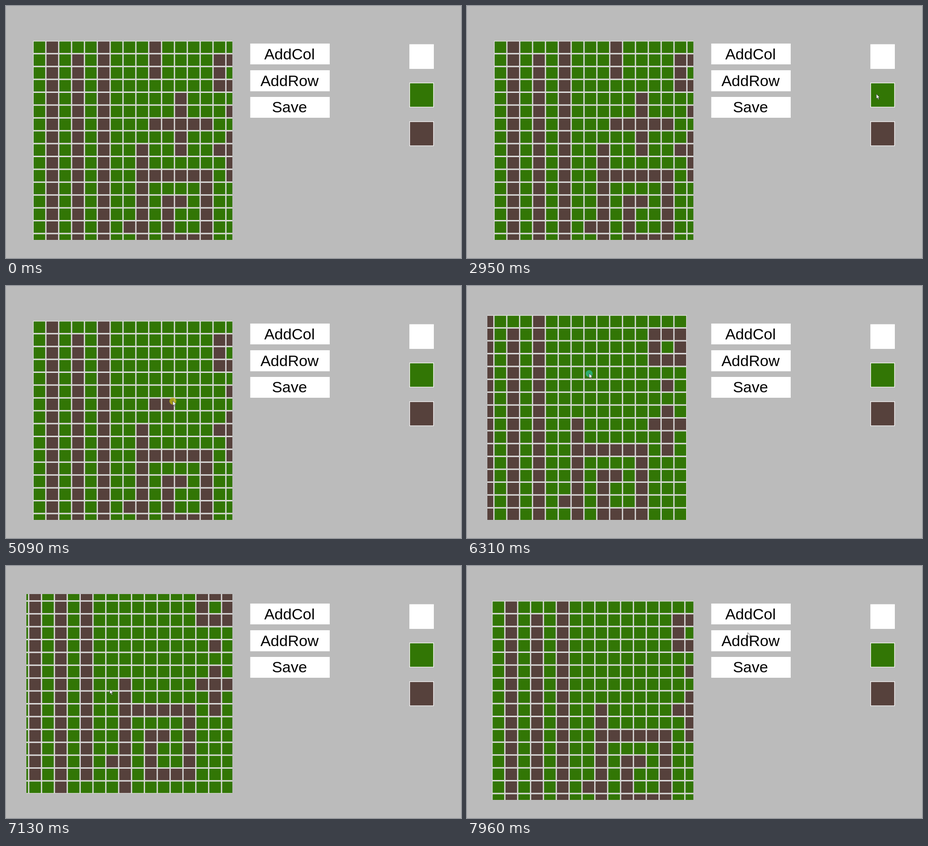
Recreate the animation shown at these times as an HTML page with a canvas. Size 1005 px wide and 557 px high, loop 8000 ms.

```html
<!DOCTYPE html>
<html>
<head>
<meta charset="utf-8">
<title>Tile editor</title>
<style>
  html, body { margin: 0; width: 100%; height: 100%; overflow: hidden; background: #bbb; }
  svg, canvas { position: absolute; left: 0; top: 0; }
  text { font: 34px "Liberation Sans", Arial, sans-serif; text-anchor: middle; fill: #000; }
</style>
</head>
<body>
<svg width="1005" height="557">
  <g fill="#fff">
    <rect x="539.5" y="83" width="175.5" height="46"/>
    <rect x="539.5" y="142" width="175.5" height="46.5"/>
    <rect x="539.5" y="201" width="175.5" height="46"/>
    <rect x="891" y="84.5" width="54" height="54.5"/>
    <rect x="891" y="169.5" width="54" height="54.5"/>
    <rect x="891" y="255" width="54" height="54.5"/>
  </g>
  <rect x="892.3" y="170.8" width="51.4" height="52" fill="#327605"/>
  <rect x="892.3" y="256.3" width="51.4" height="52" fill="#56413c"/>
  <text x="626.2" y="117.6">AddCol</text>
  <text x="626.2" y="176.5">AddRow</text>
  <text x="626.2" y="235.4">Save</text>
</svg>
<canvas id="stage" width="1005" height="557"></canvas>
<script>
const ctx = document.getElementById('stage').getContext('2d');
const LOOP = 8000, STEP = 10, LAG = 40, PITCH = 28.4, SIZE = 17;
const GREEN = '#327605', BROWN = '#56413c';
const arrow = new Path2D('M0 0V10.5L2.4 8.3 4.2 12.3 5.8 11.5 4.1 7.7 7.2 7.5Z');
const clamp = (v, lo, hi) => Math.max(lo, Math.min(hi, v));

// Time at which each tile turns green; 0 means always green
const greenFrom = new Array(SIZE * SIZE).fill(0);

function path(...points) {
  points.forEach(([c, r], i) => {
    const [pc, pr] = points[i - 1] || [c, r];
    const n = Math.max(Math.abs(c - pc), Math.abs(r - pr)) || 1;
    for (let k = 0; k <= n; k++)
      greenFrom[(pr + (r - pr) * k / n) * SIZE + pc + (c - pc) * k / n] = Infinity;
  });
}
function plus(c, r, arm) {
  path([c - arm, r], [c + arm, r]);
  path([c, r - arm], [c, r + arm]);
}

path([1, 0], [1, 15]);
path([3, 1], [3, 16]);
path([5, 0], [5, 15]);
path([8, 16], [8, 8]);
path([8, 10], [13, 10], [13, 15], [10, 15], [10, 12], [11, 12]);
path([7, 14]);
path([9, 0], [9, 2]);
path([14, 1], [16, 1], [16, 3], [14, 3], [14, 1]);
path([15, 5]);
path([15, 10]);
plus(11, 6, 2);
plus(15, 8, 1);

// Pointer stops: time, x, y
const stops = [
  [50, 946, 536], [270, 723, 263], [520, 723, 263], [1050, 919, 167],
  [1250, 914, 190], [1360, 914, 190], [1850, 915, 122], [1990, 913, 115],
  [2190, 913, 115], [2430, 920, 193], [2890, 920, 193], [3200, 690, 208],
  [3670, 323, 139], [3800, 322, 98], [3840, 322, 98], [4200, 386, 196],
  [4620, 386, 318], [4850, 442, 260], [5090, 369, 254], [5180, 320, 258],
  [5340, 320, 258], [6110, 345, 206], [6150, 345, 206], [6500, 134, 165],
  [6640, 128, 142], [6780, 142, 140], [7130, 229, 272], [7200, 255.5, 310],
  [7450, 289, 372], [7770, 503, 225], [7960, 620, 147]
];
const isPainting = t => t >= 3640 && t < 5240;
const isDragging = t => t >= 6150 && t < 6780 || t >= 7200 && t < 7450;

// Slope at a stop, flat at turns and rests
function slope(i, axis) {
  const a = stops[i - 1], b = stops[i], c = stops[i + 1];
  if (!a || !c || (b[axis] - a[axis]) * (c[axis] - b[axis]) <= 0) return 0;
  return (c[axis] - a[axis]) / (c[0] - a[0]);
}

function pointerAt(t) {
  const next = stops.findIndex(s => s[0] > t);
  if (next === 0) return stops[0].slice(1);
  if (next < 0) return stops[stops.length - 1].slice(1);
  const a = stops[next - 1], b = stops[next];
  const span = b[0] - a[0], p = (t - a[0]) / span, q = 1 - p;
  return [1, 2].map(k =>
    a[k] * q * q * (1 + 2 * p) + b[k] * p * p * (1 + 2 * q) +
    span * p * q * (slope(next - 1, k) * q - slope(next, k) * p));
}

// Play the session once: painting turns tiles green, dragging scrolls within limits
const scroll = [];
let ox = 60.5, oy = 77.5;
for (let t = 0; t <= LOOP; t += STEP) {
  const [x, y] = pointerAt(t);
  if (isPainting(t)) {
    const tile = Math.floor((y - oy) / PITCH) * SIZE + Math.floor((x - ox) / PITCH);
    greenFrom[tile] = Math.min(greenFrom[tile], t + LAG);
  }
  scroll.push([ox, oy]);
  if (isDragging(t)) {
    const [nx, ny] = pointerAt(t + STEP);
    ox = clamp(ox + nx - x, 3.5, 60.5);
    oy = clamp(oy + ny - y, 20.5, 77.5);
  }
}

function drawGrid(t) {
  const [left, top] = scroll[Math.floor(t / STEP)];
  ctx.save();
  ctx.beginPath();
  ctx.rect(45, 62, 455, 455);
  ctx.clip();
  greenFrom.forEach((time, i) => {
    const x = left + i % SIZE * PITCH, y = top + Math.floor(i / SIZE) * PITCH;
    ctx.fillStyle = '#eee';
    ctx.fillRect(x - 0.5, y - 0.4, 27.6, 27.6);
    ctx.fillStyle = t < time ? BROWN : GREEN;
    ctx.fillRect(x + 0.5, y + 0.9, 25.7, 25.4);
  });
  ctx.restore();
}

function drawPointer(t) {
  if (t < stops[0][0]) return;
  const painting = isPainting(t);
  ctx.save();
  ctx.translate(...pointerAt(t));
  if (painting || isDragging(t)) {
    ctx.fillStyle = painting ? 'rgba(190,180,20,.78)' : 'rgba(45,180,130,.88)';
    ctx.beginPath();
    ctx.arc(0, 0.5, 7.7, 0, Math.PI * 2);
    ctx.fill();
  }
  ctx.fillStyle = '#fff';
  ctx.strokeStyle = '#333';
  ctx.lineWidth = 0.8;
  ctx.fill(arrow);
  ctx.stroke(arrow);
  ctx.restore();
}

function frame(now) {
  const t = now % LOOP;
  ctx.clearRect(0, 0, 1005, 557);
  drawGrid(t);
  drawPointer(t);
  requestAnimationFrame(frame);
}
requestAnimationFrame(frame);
</script>
</body>
</html>
```
